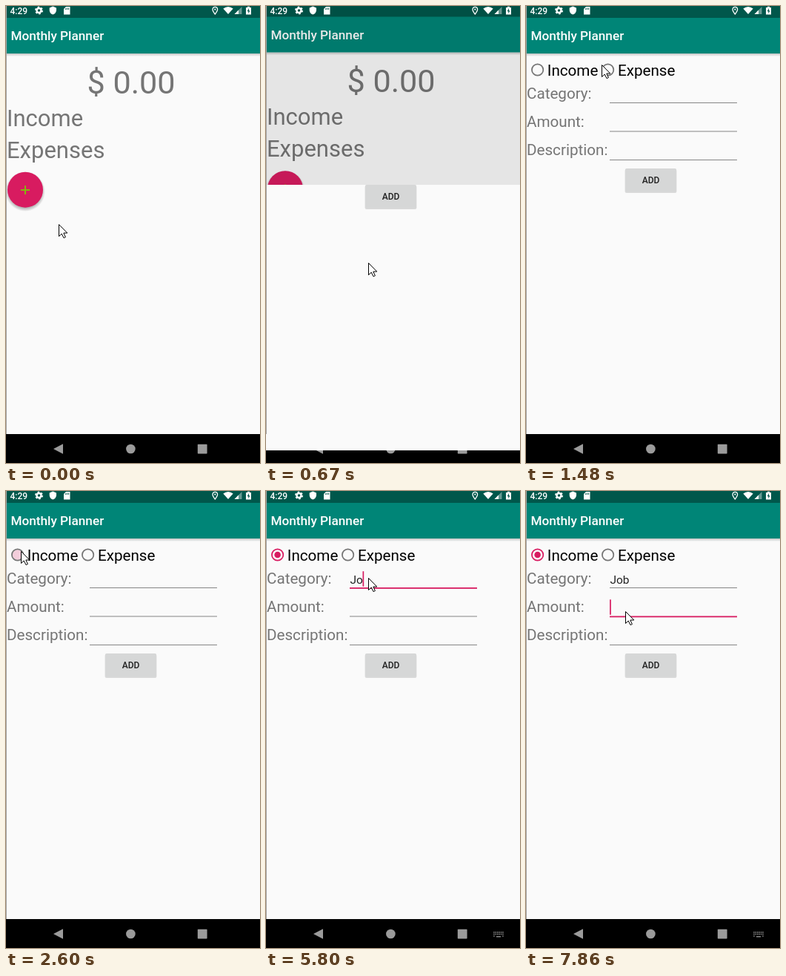
Animation of 343x616 px, one loop 8000 ms. Source, as an HTML page:

```html
<!DOCTYPE html>
<html lang="en">
<head>
<meta charset="utf-8">
<title>Monthly Planner</title>
<style>
  html, body { margin: 0; width: 100%; height: 100%; overflow: hidden; background: #000; }
  svg { display: block; width: 100%; height: 100%; font-family: Roboto, sans-serif; }
  .title { font-size: 17.2px; font-weight: 500; fill: #fff; }
  .big { font-size: 31px; fill: #757575; }
  .label { font-size: 20.64px; fill: #757575; }
  .choice { font-size: 20.64px; fill: #000; }
  .typed { font-size: 15.5px; fill: #212121; }
</style>
</head>
<body>
<svg viewBox="0 0 343 616">
  <defs>
    <linearGradient id="fade" x2="0" y2="1">
      <stop stop-opacity=".22"/><stop offset="1" stop-opacity="0"/>
    </linearGradient>
    <radialGradient id="halo">
      <stop offset=".8" stop-opacity=".3"/><stop offset="1" stop-opacity="0"/>
    </radialGradient>
    <clipPath id="page"><rect width="343" height="577"/></clipPath>
    <clipPath id="reveal"><rect id="revealBox" width="343" height="616"/></clipPath>
    <g id="frame">
      <rect width="343" height="577" fill="#fafafa"/>
      <rect y="64" width="343" height="4" fill="url(#fade)"/>
      <rect width="343" height="64" fill="#008577"/>
      <rect width="343" height="16" fill="#00574b"/>
      <text class="title" x="6.4" y="46.4">Monthly Planner</text>
    </g>
  </defs>

  <rect width="343" height="616"/>
  <g fill="#9b9b9b">
    <path d="M64 597L77 590.3V603.7z"/>
    <circle cx="168.4" cy="597" r="6.3"/>
    <rect x="258.8" y="590.8" width="12.8" height="12.8" rx=".8"/>
    <g id="keys" fill="#8c8c8c"></g>
  </g>

  <g id="home">
    <use href="#frame"/>
    <text x="169" y="118" font-size="43.2" fill="#757575" text-anchor="middle">$ 0.00</text>
    <text class="big" x="1" y="161.8">Income</text>
    <text class="big" x="1" y="205">Expenses</text>
    <circle cx="26" cy="250" r="27" fill="url(#halo)"/>
    <circle cx="26" cy="247.7" r="24" fill="#d81b60"/>
    <path d="M20 248H32M26 242V254" stroke="#86b50f" stroke-width="2"/>
    <rect id="shade" width="343" height="577"/>
  </g>

  <g id="formClip" clip-path="url(#reveal)">
    <g id="form">
      <use href="#frame"/>
      <circle id="ripple" cx="15.6" cy="86" r="17" fill="#d81b60"/>
      <g fill="none" stroke-width="1.75">
        <circle id="ring" cx="15.6" cy="86" r="7.7"/>
        <circle cx="110.6" cy="86" r="7.7" stroke="#757575"/>
      </g>
      <circle id="dot" cx="15.6" cy="86" fill="#d81b60"/>
      <text class="choice" x="28.8" y="94">Income</text>
      <text class="choice" x="124" y="94">Expense</text>
      <text class="label" x="1" y="124.6">Category:</text>
      <text class="label" x="1" y="162.9">Amount:</text>
      <text class="label" x="1" y="201.2">Description:</text>
      <rect id="line0" x="113" y="130" width="172"/>
      <rect id="line1" x="113" y="168.5" width="172"/>
      <rect x="113" y="207" width="172" height="1" fill="#868686"/>
      <text id="typed" class="typed" x="113.4" y="124.5"></text>
      <rect id="caret" width="1.7" height="20.5" fill="#d81b60"/>
      <rect x="133.6" y="220" width="69.8" height="32" rx="2" opacity=".13"/>
      <rect x="134" y="219" width="69" height="31.6" rx="1.7" fill="#d6d7d7"/>
      <text x="168.5" y="239.4" font-size="12.04" font-weight="500" fill="#212121" text-anchor="middle">ADD</text>
    </g>
  </g>

  <rect width="1" height="577" fill="#a6a6a6"/>
  <g fill="#fff">
    <text x="5.5" y="10.5" font-size="12" font-weight="500">4:29</text>
    <circle cx="44.5" cy="6" r="3" fill="none" stroke="#fff" stroke-width="2.4"/>
    <circle cx="44.5" cy="6" r="4.7" fill="none" stroke="#fff" stroke-width="1.6" stroke-dasharray="2.46"/>
    <path d="M63.3 .6L68 2.6V6Q67.500 10 63.300 11.600 59 10 58.700 6V2.600z"/>
    <path d="M81 1H86.500V11.500H78V4z"/>
    <path d="M80.600 3V5M82.500 2.500V5M84.500 2.500V5" stroke="#00574b" stroke-width=".9"/>
    <path d="M282.300 11Q279 7 279 4.600A3.300 3.300 0 0 1 285.600 4.600Q285.600 7 282.300 11z" fill="none" stroke="#fff" stroke-width="1.3"/>
    <circle cx="282.300" cy="4.600" r="1.100"/>
    <path d="M293.300 3.500Q300 -1.500 306.700 3.500L300 11z"/>
    <path d="M308.500 11H318.500V1z" opacity=".4"/>
    <path d="M308.500 11H314V5.500z"/>
    <path d="M326 .8H329V2H331V11.500H324V2H326z"/>
    <path d="M328 3L325.700 7.200H327.300V10.300L329.500 6.200H328z" fill="#00574b"/>
  </g>
  <path id="pointer" d="M.5 .5V16.500L4.200 13 7 18.600 9.400 17.500 6.800 12H11.800z" fill="#fff" stroke="#000"/>
</svg>
<script>
const LOOP = 8000;
const $ = id => document.getElementById(id);
const set = (id, attrs) => {
  for (const k in attrs) $(id).setAttribute(k, attrs[k]);
};
const clamp = v => Math.max(0, Math.min(1, v));

const TICKS = [0, 120, 250, 390, 530, 670, 820, 970, 1090,
  1210, 1350, 1480, 1620, 1760, 1900, 2040, 2180,
  2480, 2620, 2750, 2880, 3010, 3150, 3290, 3420, 3570, 3710,
  4150, 4580, 5000, 5120, 5550, 5800, 6320, 6730,
  7130, 7280, 7430, 7570, 7720, 7860];

// time, x, y
const POINTER = [[0, 71, 294], [530, 138, 346], [970, 138, 346], [1090, 143, 239],
  [1210, 130, 155], [1350, 114, 104], [1480, 102, 79], [1760, 62, 75], [2180, 20, 81],
  [2620, 20, 81], [2880, 62, 94], [3150, 128, 112], [3290, 138, 115],
  [7130, 138, 118], [7430, 136, 145], [7720, 134, 162]];

// time, typed text, caret visible
const TYPING = [[0, '', 0], [3570, '', 1], [4150, '', 0], [4580, '', 1], [5000, '', 0],
  [5120, 'J', 1], [5550, 'J', 0], [5800, 'Jo', 1], [6320, 'Jo', 0],
  [6730, 'Job', 1], [7280, 'Job', 0], [7860, 'Job', 1]];

const OPEN = 581, OPEN_MS = 460, CHECK = 2480, FOCUS = 3420, NEXT = 7720;

const last = (list, test) => list.filter(test).pop();

function pointerAt(t) {
  const i = POINTER.findIndex(k => k[0] > t);
  if (i < 0) return POINTER[POINTER.length - 1].slice(1);
  const [t0, x0, y0] = POINTER[i - 1], [t1, x1, y1] = POINTER[i];
  const p = (t - t0) / (t1 - t0);
  return [Math.round(x0 + (x1 - x0) * p), Math.round(y0 + (y1 - y0) * p)];
}

// cubic-bezier(.4, 0, .2, 1)
function ease(x) {
  let lo = 0, hi = 1;
  for (let i = 0; i < 24; i++) {
    const s = (lo + hi) / 2, r = 1 - s;
    if (1.2 * r * r * s + 0.6 * r * s * s + s * s * s < x) lo = s; else hi = s;
  }
  return lo * lo * (3 - 2 * lo);
}

function drawOpening(t) {
  const u = clamp((t - OPEN) / OPEN_MS), p = ease(u);
  const drop = Math.round(25.2 * (1 - p));
  const top = u < 1 ? Math.round(616 * (1 - u) ** 4.8 + drop) : 0;
  set('home', { transform: `translate(0 ${(-12.3 * p).toFixed(2)})` });
  set('shade', { opacity: Math.min(0.1, u * 0.42) });
  set('formClip', { visibility: u > 0 ? 'visible' : 'hidden' });
  set('form', { transform: `translate(0 ${drop})` });
  set('revealBox', { y: top, height: 616 - top });
}

function drawLine(id, focused) {
  set(id, { height: focused ? 1.8 : 1, fill: focused ? '#d81b60' : '#868686' });
}

function drawForm(t) {
  const on = t >= CHECK + 100;
  const wave = clamp((t - CHECK + 120) / 300), gone = clamp((t - 2750) / 400);
  set('ripple', { r: 17 * wave, opacity: t >= CHECK ? 0.2 * (1 - gone) : 0 });
  set('ring', { stroke: on ? '#d81b60' : '#757575' });
  set('dot', { r: on ? 4.3 * clamp((t - CHECK) / 200) : 0 });

  const second = t >= NEXT;
  drawLine('line0', t >= FOCUS && !second);
  drawLine('line1', second);

  const [, text, caret] = last(TYPING, k => k[0] <= t);
  const typed = $('typed');
  if (typed.textContent !== text) typed.textContent = text;
  const width = text && !second ? typed.getComputedTextLength() : 0;
  set('caret', { x: 113.1 + width, y: second ? 146.3 : 108.2, opacity: caret });
}

function render(now) {
  const t = last(TICKS, k => k <= now);
  drawOpening(t);
  drawForm(t);
  set('keys', { opacity: t >= 3710 ? 1 : 0 });
  set('pointer', { transform: `translate(${pointerAt(t)})` });
}

// Keyboard glyph in the navigation bar
let keys = '<rect x="311" y="600" width="6" height="1.4"/>';
for (let row = 0; row < 3; row++)
  for (let col = 0; col < 6; col++)
    if (row < 2 || col % 5 === 0)
      keys += `<rect x="${307.2 + col * 2.4}" y="${594 + row * 2.6}" width="1.5" height="1.5"/>`;
$('keys').innerHTML = keys;

const start = performance.now();
function tick() {
  render((performance.now() - start) % LOOP);
  requestAnimationFrame(tick);
}
tick();
</script>
</body>
</html>
```
